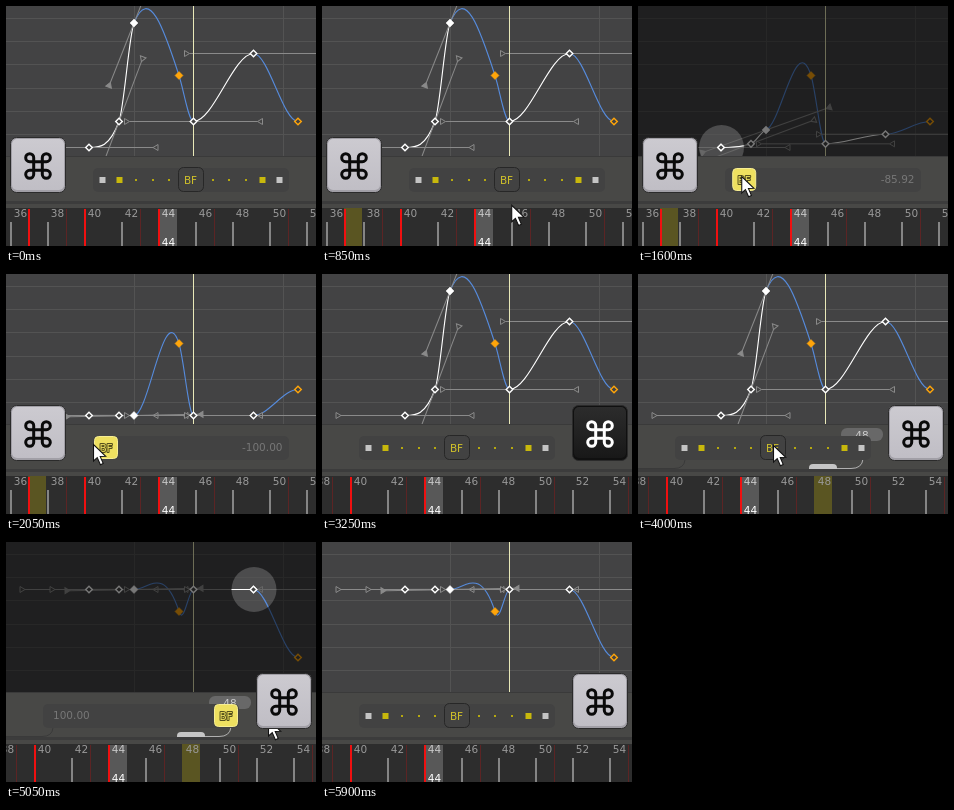
An HTML page with a canvas for the animation above (6050 ms loop, 310 by 240 pixels).

```html
<!DOCTYPE html>
<html lang="en">
<head>
<meta charset="utf-8">
<title>Blend to frame</title>
<style>
html, body { margin: 0; width: 100%; height: 100%; overflow: hidden; background: #434343; }
canvas { position: absolute; left: 0; top: 0; width: 310px; height: 240px; }
</style>
</head>
<body>
<canvas id="first" width="310" height="240"></canvas>
<canvas id="second" width="310" height="240"></canvas>
<script>
const LOOP = 6050, STEP = 50, HANDLE = 67, FRAME = 18.5;
const FONT = '10.5px "DejaVu Sans", sans-serif';
const clamp = (v, lo = 0, hi = 1) => Math.min(hi, Math.max(lo, v));
const ramp = (t, from, to) => clamp((t - from) / (to - from));
const mix = (a, b, k) => a + (b - a) * k;

// Animation curve keys; slope is in pixels, downwards positive.
const KEYS = [
  { x: 83, y: 141.5, slope: 0 },
  { x: 113, y: 115.5, slope: -2.67 },
  { x: 128, y: 17, slope: -2.52, filled: true },
  { x: 173, y: 69.5, slope: 3.1, fixed: true, filled: true },
  { x: 187.5, y: 115.5, slope: 0 },
  { x: 247.5, y: 47.5, slope: 0 },
  { x: 292, y: 115.5, slope: 0, fixed: true }
];

const SCENES = [
  { id: 'first', dir: -1, shift: 0, capX: 4, frame: 37, pivot: KEYS[0],
    press: 250, enter: 700, arrive: 950, grab: 1000, release: 2050, drop: Infinity,
    dragFrom: 1114, dragTo: 1700, tipFrom: 182, tipTo: 87, tipY: [170, 170], grip: 3 },
  { id: 'second', dir: 1, shift: -50, capX: 250, frame: 48, pivot: KEYS[5],
    press: 3250, enter: 3750, arrive: 4000, grab: 4150, release: 5200, drop: 5350,
    dragFrom: 4256, dragTo: 5050, tipFrom: 135, tipTo: 262, tipY: [171, 177], grip: 0, drawer: true }
];
for (const s of SCENES) s.ctx = document.getElementById(s.id).getContext('2d');

let c;
function path(points, close) {
  c.beginPath();
  points.forEach(([x, y]) => c.lineTo(x, y));
  if (close) c.closePath();
}
function line(x1, y1, x2, y2, color, width = 1) {
  path([[x1, y1], [x2, y2]]);
  c.strokeStyle = color;
  c.lineWidth = width;
  c.stroke();
}
function rect(x, y, w, h, color) {
  c.fillStyle = color;
  c.fillRect(x, y, w, h);
}
function box(x, y, w, h, r, fill, stroke) {
  c.beginPath();
  c.roundRect(x, y, w, h, r);
  c.fillStyle = fill;
  c.fill();
  if (stroke) { c.strokeStyle = stroke; c.lineWidth = 1; c.stroke(); }
}
function text(str, x, y, color, align = 'center', outline) {
  c.font = FONT;
  c.textAlign = align;
  if (outline) {
    c.strokeStyle = outline;
    c.lineWidth = 2;
    c.lineJoin = 'round';
    c.strokeText(str, x, y);
    c.lineJoin = 'miter';
  }
  c.fillStyle = color;
  c.fillText(str, x, y);
}
function faded(alpha, draw) {
  if (alpha <= 0) return;
  c.save();
  c.globalAlpha = alpha;
  draw();
  c.restore();
}

function blend(pivot, k) {
  return KEYS.map(key => key.fixed ? key : {
    ...key, y: mix(key.y, pivot.y, k), slope: key.slope * Math.max(1 - k, key.filled ? 0.007 : 0)
  });
}

function drawHandles(keys) {
  for (const key of keys) {
    if (key.fixed) continue;
    const angle = Math.atan(key.slope);
    for (const side of [-1, 1]) {
      c.save();
      c.translate(key.x, key.y);
      c.rotate(angle);
      c.scale(side, 1);
      line(0, 0, HANDLE - 3, 0, '#8a8a8a');
      path([[HANDLE - 3, 0], [HANDLE + 2, -3], [HANDLE + 2, 3]], true);
      c.fillStyle = key.filled ? '#8a8a8a' : '#434343';
      c.fill();
      c.stroke();
      c.restore();
    }
  }
}

function drawCurve(keys) {
  for (let i = 1; i < keys.length; i++) {
    const a = keys[i - 1], b = keys[i], d = (b.x - a.x) / 3;
    c.beginPath();
    c.moveTo(a.x, a.y);
    c.bezierCurveTo(a.x + d, a.y + d * a.slope, b.x - d, b.y - d * b.slope, b.x, b.y);
    c.strokeStyle = a.fixed || b.fixed ? '#568bdc' : '#fff';
    c.lineWidth = 1.1;
    c.stroke();
  }
}

function drawKeys(keys) {
  for (const { x, y, fixed, filled } of keys) {
    const color = fixed ? '#ffa50a' : '#fff', r = filled ? 4 : 3.3;
    path([[x, y - r], [x + r, y], [x, y + r], [x - r, y]], true);
    c.fillStyle = filled ? color : '#434343';
    c.fill();
    c.strokeStyle = color;
    c.lineWidth = filled ? 0.5 : 1.4;
    c.stroke();
  }
}

function drawGraph(s, k, dim) {
  c.save();
  c.beginPath();
  c.rect(0, 0, 310, 150);
  c.clip();
  rect(0, 0, 310, 150, '#434344');
  for (let i = 0; i < 6; i++) rect(0, Math.round(12 + i * 23.2), 310, 1, '#535353');
  for (const x of [128, 277]) rect(x, 0, 1, 150, '#535353');
  const keys = blend(s.pivot, k);
  drawCurve(keys);
  drawHandles(keys);
  rect(187, 0, 1, 150, '#e8e8b8');
  drawKeys(keys);
  rect(0, 0, 310, 150, `rgba(0,0,0,${0.53 * dim})`);
  faded(dim, () => {
    c.beginPath();
    c.arc(s.pivot.x + .5, s.pivot.y, 22.5, 0, 7);
    c.fillStyle = 'rgba(255,255,255,.2)';
    c.fill();
    c.clip();
    drawCurve(keys);
    drawKeys(keys);
  });
  c.restore();
}

function drawRuler(s, marked) {
  rect(0, 202, 310, 38, '#2d2d2d');
  const left = frame => Math.round(4.5 + s.shift + (frame - 36) * FRAME);
  rect(left(44), 203, 18, 37, '#585858');
  for (let f = 35; f < 56; f++) {
    const x = left(f);
    if (f % 4 === 3) rect(x, 203, 1, 37, '#5c2424');
    if (f % 2 === 0) rect(x - 1, 216, 2, 24, '#858585');
  }
  if (marked) rect(left(s.frame) - 1, 202, 18, 38, '#5a5522');
  for (const f of [37, 40, 44]) rect(left(f) - 1, 203, 2, 37, '#f01010');
  for (let f = 36; f < 56; f += 2) text(f, left(f) + 9.5, 211, f === 44 ? '#c8c8c8' : '#999');
  text('44', left(44) + 9.5, 240, '#fff');
}

function drawDrawer(alpha) {
  faded(alpha, () => {
    box(203, 154, 42, 13, 6, '#686868');
    text('48', 224, 165, '#ccc');
    c.beginPath();
    c.moveTo(199, 194.5);
    c.lineTo(213, 194.5);
    c.quadraticCurveTo(224, 194.5, 225, 185);
    c.strokeStyle = '#b0b0b0';
    c.lineWidth = 1;
    c.stroke();
    c.beginPath();
    c.moveTo(0, 194.5);
    c.lineTo(36, 194.5);
    c.quadraticCurveTo(46, 194.5, 47, 186);
    c.strokeStyle = '#3a3a3a';
    c.stroke();
  });
}

function drawSlider(s, offset, value, active) {
  const mid = 185 + s.shift;
  box(mid - 98, 162, 196, 24, 5, '#424242');
  faded(1 - active, () => {
    for (const side of [-1, 1]) {
      rect(mid + side * 88.5 - 3, 171, 6, 6, '#c4c4c4');
      rect(mid + side * 71.5 - 3, 171, 6, 6, '#c8b80c');
      for (const d of [22, 38, 55]) rect(mid + side * d - 1, 173, 2, 2, '#b5a810');
    }
    box(mid - 12.5, 161.5, 25, 24, 5, '#424242', '#272727');
    text('BF', mid - .5, 177.5, '#cfc02a');
  });
  faded(active, () => {
    const label = (value * 100 * s.dir).toFixed(2);
    text(label, mid + (s.dir < 0 ? 91.5 : -88), 177, '#777', s.dir < 0 ? 'right' : 'left');
    const x = mid + offset;
    box(x - 11.5, 162.5, 23, 22, 4, '#eee060', '#f6ed92');
    text('BF', x, 177.5, '#eee060', 'center', '#55501c');
  });
}

function drawCursor(x, y) {
  c.save();
  c.translate(x, y);
  c.scale(1.06, 1.06);
  path([[.5, .5], [.5, 16], [4, 12.8], [7, 19.5], [9.6, 18.3], [6.8, 11.8], [12, 11.6]], true);
  c.fillStyle = '#fff';
  c.fill();
  c.strokeStyle = '#111';
  c.lineWidth = 1;
  c.stroke();
  c.restore();
}

function drawCap(x, pressed) {
  c.save();
  c.translate(x, 131);
  box(.5, .5, 55, 55, 6, pressed ? '#101010' : '#a19fa6', '#2b2b2b');
  const face = c.createLinearGradient(0, 2, 0, 53);
  face.addColorStop(0, pressed ? '#2c2c2c' : '#cccad0');
  face.addColorStop(1, pressed ? '#181818' : '#c0bec5');
  box(2, 2, 52, 51, 5, face);
  c.translate(28, 29);
  c.beginPath();
  c.rect(-4.3, -4.3, 8.6, 8.6);
  for (let i = 0; i < 4; i++) {
    c.rotate(Math.PI / 2);
    c.moveTo(4.3, -4.3);
    c.lineTo(4.3, -8.3);
    c.arc(8.3, -8.3, 4, Math.PI, Math.PI / 2);
    c.lineTo(4.3, -4.3);
  }
  c.strokeStyle = pressed ? '#fff' : '#0a0a0a';
  c.lineWidth = 3;
  c.stroke();
  c.restore();
}

function drawScene(s, t) {
  c = s.ctx;
  const mid = 185 + s.shift;
  const drag = ramp(t, s.dragFrom, s.dragTo);
  const arrive = ramp(t, s.enter, s.arrive);
  const tip = mix(s.tipFrom, s.tipTo, drag);
  const offset = clamp(tip + s.grip - mid, -85, 85);
  const value = (offset / 85) ** 2;
  const dim = t < s.release ? ramp(t, s.grab - STEP, s.grab + 2 * STEP) : 0;
  const held = t < s.drop ? 1 : t < s.drop + 100 ? .5 : 0;
  const marked = t >= s.press + 200 && held === 1;

  drawGraph(s, value, dim);
  rect(0, 150, 310, 52, '#484846');
  rect(0, 150, 310, 1, '#3a3a3a');
  rect(0, 195, 310, 3, '#3c3c3c');
  if (s.drawer) {
    drawDrawer(ramp(t, 3750, 4000) * held);
    if (t >= s.press + 200) faded(held, () => box(171, 190, 28, 5, [4, 4, 0, 0], '#c6c6c6'));
  }
  drawSlider(s, offset, value, t >= s.grab ? held : 0);
  drawRuler(s, marked);
  const shown = t < 5750 ? 1 : t < 5900 ? .5 : 0;
  if (arrive > 0) faded(shown, () =>
    drawCursor(mix(s.tipFrom + 18, tip, arrive), mix(242, mix(...s.tipY, drag), arrive)));
  drawCap(s.capX, t >= s.press && t < s.press + 200);
}

const start = performance.now();
function tick() {
  const t = Math.floor((performance.now() - start) % LOOP / STEP) * STEP;
  const swap = ramp(t, 2250, 2600);
  if (swap < 1) drawScene(SCENES[0], t);
  if (swap > 0) drawScene(SCENES[1], t);
  SCENES[1].ctx.canvas.style.opacity = swap;
  requestAnimationFrame(tick);
}
tick();
</script>
</body>
</html>
```
